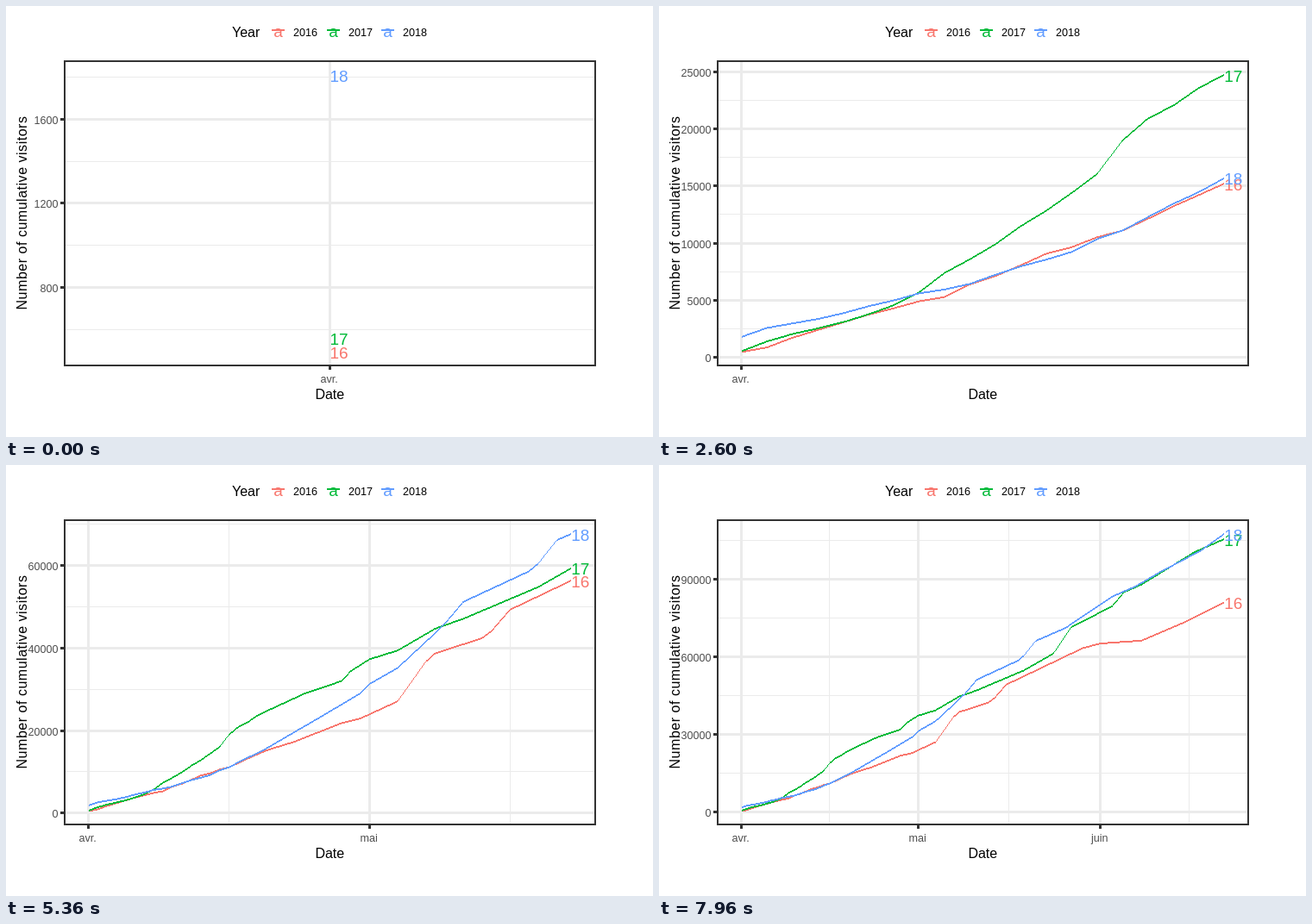
An HTML page with a canvas for the animation above (8 s loop, 750 px wide and 500 px high).

```html
<!DOCTYPE html>
<html lang="en">
<head>
<meta charset="utf-8">
<title>Cumulative visitors</title>
<style>
  html, body { margin: 0; width: 100%; height: 100%; overflow: hidden; background: #fff; }
  canvas { display: block; }
</style>
</head>
<body>
<canvas id="stage" width="750" height="500"></canvas>
<script>
const ctx = document.getElementById('stage').getContext('2d');
const LOOP = 8000, HOLD = 1000, STEP = 40, LAST = 175;
const FRAMES_PER_DAY = 2.135;
const PANEL = { l: 68, t: 64, r: 683, b: 417 };
const X0 = 95.5, X1 = 655, Y0 = 401.4, Y1 = 80;
const FONT = '"Liberation Sans", Arial, sans-serif';
const MONTHS = [[0, 'avr.'], [30, 'mai'], [61, 'juin']];

// Thousands of visitors: one value per day at first, then [day, value] knots.
const SERIES = [
  { year: 2016, color: '#F8766D',
    daily: [.494, .89, 1.73, 2.41, 3.08, 3.76, 4.32, 4.92, 5.3, 6.41,
      7.13, 8.07, 9.08, 9.65, 10.52, 11.1, 12.13, 13.22, 14.2, 15.2],
    knots: [[22, 17.3], [27, 21.8], [29, 22.9], [33, 27.1], [36, 36.7], [37, 38.7], [42, 42.4],
      [43, 44.1], [45, 49.3], [58, 63.4], [61, 65.2], [68, 66.3], [75, 73.1], [82, 81.1]] },
  { year: 2017, color: '#00BA38',
    daily: [.56, 1.41, 2.06, 2.55, 3.1, 3.78, 4.58, 5.71, 7.41, 8.6,
      9.91, 11.49, 12.84, 14.39, 16.04, 18.97, 20.89, 22.02, 23.56, 24.7],
    knots: [[23, 28.9], [27, 32], [28, 34.4], [30, 37.3], [33, 39.4], [37, 44.7], [40, 47.1],
      [48, 54.8], [53, 61.3], [56, 71.4], [63, 79.6], [65, 85], [68, 88], [77, 100.5], [82, 105.5]] },
  { year: 2018, color: '#619CFF',
    daily: [1.81, 2.59, 2.99, 3.37, 3.88, 4.49, 5, 5.62, 5.96, 6.45,
      7.24, 7.99, 8.56, 9.24, 10.36, 11.1, 12.28, 13.44, 14.46, 15.67],
    knots: [[25, 23.6], [29, 29], [30, 31.3], [33, 35.2], [36, 41.5], [38, 45.8], [40, 51.2],
      [47, 58.6], [48, 60.5], [50, 66.2], [55, 71.1], [63, 83.3], [67, 87.3], [71, 92.6],
      [78, 101], [82, 107.5]] }
];

for (const s of SERIES) {
  s.values = s.daily.map(v => v * 1000);
  let [d0, v0] = [s.daily.length - 1, s.daily[s.daily.length - 1]];
  for (const [d1, v1] of s.knots) {
    for (let d = d0 + 1; d <= d1; d++) s.values[d] = 1000 * (v0 + (v1 - v0) * (d - d0) / (d1 - d0));
    [d0, v0] = [d1, v1];
  }
}

function valueAt(s, day) {
  const d = Math.floor(day), v = s.values[d];
  return day === d ? v : v + (s.values[d + 1] - v) * (day - d);
}

// Days fall on whole frames; the head moves linearly between them.
function dayAt(frame) {
  const at = d => Math.round(d * FRAMES_PER_DAY);
  let d = 0;
  while (at(d + 1) <= frame) d++;
  return d + (frame - at(d)) / (at(d + 1) - at(d));
}

// Extended Wilkinson axis labelling, aiming at five labels.
function niceBreaks(lo, hi) {
  const Q = [1, 5, 2, 2.5, 4, 3], M = 5, span = hi - lo;
  let best = -Infinity, found = [];
  for (let j = 1; j <= 3; j++) Q.forEach((q, i) => {
    for (let k = 2; k <= 12; k++) {
      const z0 = Math.ceil(Math.log10(span / (k + 1) / j / q));
      for (let z = z0; z < z0 + 3; z++) {
        const step = j * q * 10 ** z, width = step * (k - 1);
        const from = (Math.floor(hi / step) - (k - 1)) * j, to = Math.ceil(lo / step) * j;
        for (let start = from; start <= to; start++) {
          const a = start * step / j, b = a + width;
          const zero = start % j === 0 && a <= 0 && b >= 0 ? 1 : 0;
          const simple = 1 - i / (Q.length - 1) - j + zero;
          const cover = 1 - .5 * ((hi - b) ** 2 + (lo - a) ** 2) / (.1 * span) ** 2;
          const r = (k - 1) / width, rt = (M - 1) / (Math.max(b, hi) - Math.min(a, lo));
          const dense = 2 - Math.max(r / rt, rt / r);
          const score = .25 * simple + .2 * cover + .5 * dense + .05;
          if (score > best + 1e-9) {
            best = score;
            found = Array.from({ length: k }, (_, n) => Math.round(a + n * step));
          }
        }
      }
    }
  });
  return found.filter(v => v >= lo && v <= hi);
}

function minorBreaks(major, lo, hi) {
  if (major.length < 2) return [];
  const gap = major[1] - major[0];
  const all = [major[0] - gap, ...major, major[major.length - 1] + gap];
  return all.slice(1).map((v, i) => (v + all[i]) / 2).filter(v => v >= lo && v <= hi);
}

function rect(x, y, w, h, color) {
  ctx.fillStyle = color;
  ctx.fillRect(x, y, w, h);
}

function text(str, x, y, size, color, align = 'left') {
  ctx.font = `${size}px ${FONT}`;
  ctx.fillStyle = color;
  ctx.textAlign = align;
  ctx.fillText(str, x, y);
}

const hLine = (y, w) => rect(PANEL.l, Math.floor(y) - (w >> 1), PANEL.r - PANEL.l, w, '#EBEBEB');
const vLine = (x, w) => rect(Math.floor(x) - (w >> 1), PANEL.t, w, PANEL.b - PANEL.t, '#EBEBEB');

// Hard-edged stroke: two pixels tall, one pixel wide where steep.
function segment(xa, ya, xb, yb) {
  const slope = (yb - ya) / (xb - xa);
  if (Math.abs(slope) < 1.25) {
    for (let x = Math.round(xa); x < Math.round(xb); x++)
      ctx.fillRect(x, Math.round(ya + (x + .5 - xa) * slope) - 1, 1, 2);
  } else {
    const end = Math.round(Math.max(ya, yb));
    for (let y = Math.round(Math.min(ya, yb)); y < end; y++)
      ctx.fillRect(Math.floor(xa + (y + .5 - ya) / slope), y, 1, 1);
  }
}

function legend() {
  text('Year', 262, 36, 16, '#000');
  SERIES.forEach((s, i) => {
    const x = 308 + Math.round(i * 63.5);
    rect(x, 27, 15, 2, s.color);
    text('a', x + 7.5, 36, 19, s.color, 'center');
    text(s.year, x + 25, 35, 12.6, '#000');
  });
}

function titles() {
  text('Date', 375.3, 456, 16, '#000', 'center');
  ctx.save();
  ctx.translate(24, 240);
  ctx.rotate(-Math.PI / 2);
  ctx.letterSpacing = '0.52px';
  text('Number of cumulative visitors', 0, 0, 16, '#000', 'center');
  ctx.restore();
}

function draw(frame) {
  const day = dayAt(frame);
  const heads = SERIES.map(s => valueAt(s, day));
  const min = SERIES[0].values[0], max = Math.max(...heads);
  const pad = (max - min) * .05, lo = min - pad, hi = max + pad;
  const px = d => day ? X0 + (X1 - X0) * d / day : (X0 + X1) / 2;
  const py = v => Y0 + (Y1 - Y0) * (v - min) / (max - min);
  const ticks = niceBreaks(lo, hi);
  const months = MONTHS.filter(m => m[0] <= day * 1.05);

  rect(0, 0, 750, 500, '#fff');
  minorBreaks(ticks, lo, hi).forEach(v => hLine(py(v), 1));
  minorBreaks(months.map(m => m[0]), 0, day * 1.05).forEach(d => vLine(px(d), 1));
  ticks.forEach(v => hLine(py(v), 3));
  months.forEach(m => vLine(px(m[0]), 3));

  for (const s of SERIES) {
    ctx.fillStyle = s.color;
    for (let d = 0; d < day; d++) {
      const e = Math.min(d + 1, day);
      segment(px(d), py(s.values[d]), px(e), py(valueAt(s, e)));
    }
  }
  SERIES.forEach((s, i) =>
    text(s.year % 100, px(day) + .3, Math.round(py(heads[i]) + 7.6), 19, s.color));

  ctx.strokeStyle = '#333';
  ctx.lineWidth = 2;
  ctx.strokeRect(PANEL.l, PANEL.t, PANEL.r - PANEL.l, PANEL.b - PANEL.t);

  for (const v of ticks) {
    const y = Math.floor(py(v));
    rect(63, y - 1, 4, 3, '#333');
    text(v, 60.5, y + 6, 12.6, '#4D4D4D', 'right');
  }
  for (const [d, name] of months) {
    const x = Math.floor(px(d));
    rect(x - 1, 418, 3, 4, '#333');
    text(name, x - .3, 437, 12.6, '#4D4D4D', 'center');
  }
  legend();
  titles();
}

let shown = -1;
function tick() {
  const t = performance.now() % LOOP;
  const frame = t < HOLD ? 0 : Math.min(LAST, 1 + Math.floor((t - HOLD) / STEP));
  if (frame !== shown) draw(shown = frame);
  requestAnimationFrame(tick);
}
tick();
</script>
</body>
</html>
```
